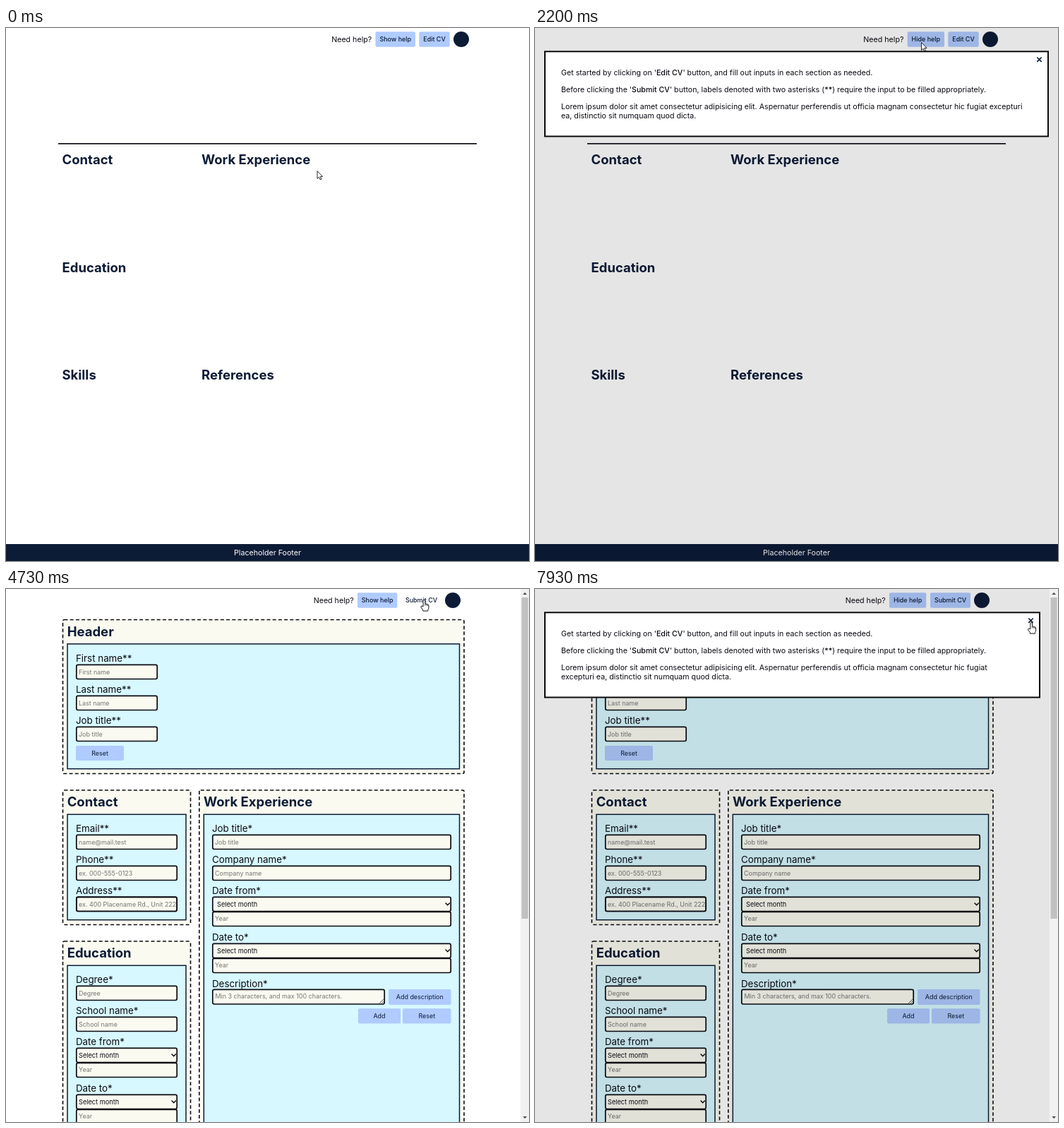
Animation of 741x755 px, one loop 8000 ms. Source, as an HTML page:

```html
<!DOCTYPE html>
<html lang="en">
<head>
<meta charset="utf-8">
<title>CV builder</title>
<style>
  html, body { margin: 0; width: 100%; height: 100%; overflow: hidden; background: #fff; }
  svg { display: block; width: 741px; height: 755px; }
  text { font: 10.667px Inter, Roboto, sans-serif; fill: #0a0a12; white-space: pre; }
  .title { font-size: 18.5px; font-weight: 700; fill: #0c1b36; }
  .label { font-size: 13.333px; }
  .hint, .btn { font-size: 8.95px; }
  .hint { fill: #757575; }
  .pick { font-size: 9.2px; }
  .btn { fill: #0c1b36; text-anchor: middle; }
  .strong { font-weight: 500; }
  .end { text-anchor: end; }
  .foot { fill: #fff; text-anchor: middle; }
  .raised { filter: drop-shadow(0 .7px 1.1px rgba(0, 0, 0, .75)); }
  .panel { fill: #fafaf0; stroke: #0a0a12; stroke-width: 1.6; stroke-dasharray: 5 3.2; }
  .inner { fill: #d7f8ff; stroke: #0c1b36; stroke-width: 1.5; }
  .field { fill: #fafaf0; stroke: #0a0a12; stroke-width: 1.7; }
  .line { fill: none; stroke: #0a0a12; stroke-linecap: round; }
</style>
</head>
<body>
<svg viewBox="0 0 741 755">
  <g id="page"></g>
  <g id="cursor" fill="#fff" stroke="#111" stroke-width="1" stroke-linejoin="round">
    <path id="arrow" d="M.5.5V11.4L3 9.1 4.7 12.9 6.5 12.1 4.8 8.4H8Z" stroke-width=".9"/>
    <g id="hand">
      <path d="M-1.4 9.3V1.4Q-1.4 0 0 0T1.4 1.4V5.4Q2.8 4.8 3.4 6 4.7 5.4 5.2 6.6 6.4 6.3 6.4 8V11Q6.4 13 5.3 14V15.6H-1.7V14.4L-4.5 10.4Q-5 8.6-3.6 8.5Z"/>
      <path d="M1.4 5.4V8M3.4 6V8.2M5.2 6.6V8.4" fill="none" stroke-width=".8"/>
    </g>
  </g>
</svg>
<script>
const LOOP = 8000;
const NAVY = '#0c1b36';
const BLUE = '#afcbff';
const $ = id => document.getElementById(id);

// Cursor moves: start, end, target x, target y
const START = [440.5, 202];
const MOVES = [
  [570, 600, 439.5, 201.5], [840, 930, 438.5, 200.5], [1150, 1800, 548.5, 21],
  [2140, 2200, 547, 20], [3080, 3330, 439.5, 13], [3760, 3800, 438.8, 12.8],
  [4000, 4470, 592.5, 15.5], [4820, 5130, 646.5, 55.5], [6220, 6680, 543.5, 22],
  [7150, 7900, 703.2, 47.5]
];

const text = (x, y, s, cls = '') => `<text x="${x}" y="${y}" class="${cls}">${s}</text>`;

const box = (x, y, x2, y2, attrs) =>
  `<rect x="${x}" y="${y}" width="${x2 - x}" height="${y2 - y}" ${attrs}/>`;

const button = (x, y, x2, y2, s, cls = '', attrs = '') =>
  box(x, y, x2, y2, attrs || `rx="2" fill="${BLUE}"`) +
  text((x + x2) / 2, (y + y2) / 2 + 3.3, s, 'btn ' + cls);

const field = (x, x2, y, y2 = y + 20.5) => box(x + .8, y + .4, x2 - .8, y2, 'rx="2.2" class="field"');

const input = (x, x2, y, label, hint) =>
  text(x, y - 4.3, label, 'label') + field(x, x2, y) + text(x + 4, y + 13.8, hint, 'hint');

const date = (x, x2, y, label, pad) =>
  text(x, y - 4.3, label, 'label') + field(x, x2, y) +
  text(x + pad, y + 13.6, 'Select month', 'pick') +
  `<path class="line" stroke-width="1.5" d="M${x2 - 8} ${y + 9}l2.7 2.7 2.7-2.7"/>` +
  field(x, x2, y + 21) + text(x + 4, y + 34.4, 'Year', 'hint');

const section = (x, y, x2, y2, title) =>
  box(x + .5, y + .5, x2 - .5, y2 - .5, 'rx="2" class="panel"') +
  text(x + 6.7, y + 23.6, title, 'title') +
  box(x + 7, y + 34.8, x2 - 7, y2 - 7.3, 'class="inner"');

function viewPage() {
  const titles = [[79.5, 193, 'Contact'], [277, 193, 'Work Experience'], [79.5, 345.5, 'Education'],
    [79.5, 498, 'Skills'], [277, 498, 'References']];
  return box(74, 163, 667, 164.7, 'fill="#0f0f18"') +
    titles.map(a => text(...a, 'title')).join('') +
    box(0, 731, 741, 755, `fill="${NAVY}"`) + text(370.5, 747, 'Placeholder Footer', 'foot');
}

function editPage() {
  return section(80, 43, 649.5, 262, 'Header') +
    input(99, 215, 107, 'First name**', 'First name') +
    input(99, 215, 151, 'Last name**', 'Last name') +
    input(99, 215, 195, 'Job title**', 'Job title') +
    button(99, 222, 167, 243, 'Reset') +

    section(80, 284.5, 262, 476, 'Contact') +
    input(99, 243, 348, 'Email**', 'name@mail.test') +
    input(99, 243, 392, 'Phone**', 'ex. 000-555-0123') +
    '<clipPath id="clip"><rect x="99" y="410" width="143" height="50"/></clipPath><g clip-path="url(#clip)">' +
    input(99, 243, 436, 'Address**', 'ex. 400 Placename Rd., Unit 222, N') + '</g>' +
    box(99.8, 436.4, 242.2, 456.5, 'rx="2.2" class="field" style="fill:none"') +

    section(80, 498.5, 262, 900, 'Education') +
    input(99, 243, 562, 'Degree*', 'Degree') +
    input(99, 243, 606, 'School name*', 'School name') +
    date(99, 243, 650, 'Date from*', 4) +
    date(99, 243, 716, 'Date to*', 4) +

    section(273.3, 284.5, 649.5, 900, 'Work Experience') +
    input(292, 631, 348, 'Job title*', 'Job title') +
    input(292, 631, 392, 'Company name*', 'Company name') +
    date(292, 631, 436, 'Date from*', 7) +
    date(292, 631, 502, 'Date to*', 7) +
    text(292, 563.5, 'Description*', 'label') + field(292, 537, 567, 588) +
    text(296.5, 579.5, 'Min 3 characters, and max 100 characters.', 'hint') +
    '<path class="line" stroke-width=".7" d="M529.5 586.5l5-5M532.5 586.5l2-2"/>' +
    button(542, 567, 630.5, 589, 'Add description') +
    button(499, 594.3, 559, 615.5, 'Add') +
    button(562, 594.3, 630.5, 615.5, 'Reset');
}

function scrollbar() {
  return box(729, 0, 741, 755, 'fill="#f1f1f1"') + box(730.5, 12, 739.7, 467, 'fill="#c1c1c1"') +
    '<path fill="#505050" d="M732.3 8l2.9-3.2 2.9 3.2zM732.3 747l2.9 3.2 2.9-3.2z"/>';
}

// Left and right edges of the two buttons in the top bar
const edges = (edit, open) => edit
  ? { help: [open ? 502 : 498, 554.3], mode: [560, 617] }
  : { help: [open ? 527.7 : 523.5, 580], mode: [585.3, 628.7] };

function topBar(edit, open, hover) {
  const e = edges(edit, open);
  const skin = (name, flat) => hover === name ? `rx="2" fill="#fff" ${flat ? '' : 'class="raised"'}` : '';
  return text(e.help[0] - 5.3, 20, 'Need help?', 'end') +
    button(e.help[0], 5.3, e.help[1], 26.7, open ? 'Hide help' : 'Show help', 'strong', skin('help')) +
    button(e.mode[0], 5.3, e.mode[1], 26.7, edit ? 'Submit CV' : 'Edit CV', 'strong', skin('mode', edit)) +
    `<circle cx="${edit ? 633 : 645}" cy="16" r="11" fill="${NAVY}"/>`;
}

function dialog(edit) {
  const right = edit ? 716 : 728;
  const strong = s => `<tspan class="strong">${s}</tspan>`;
  const lorem = 'Lorem ipsum dolor sit amet consectetur adipisicing elit. Aspernatur perferendis ut officia ' +
    'magnam consectetur hic fugiat';
  const tail = 'ea, distinctio sit numquam quod dicta.';
  return box(0, 0, edit ? 729 : 741, 755, 'fill="#000" opacity=".1"') +
    box(14, 33.3, right - 1, 153.5, 'fill="#fff" stroke="#0a0a0a" stroke-width="2"') +
    `<path class="line" stroke-width="1.7" style="stroke:${NAVY}" d="M${right - 16.2} 42l5.4 5.4m0-5.4l-5.4 5.4"/>` +
    text(37, 66.6, `Get started by clicking on '${strong('Edit CV')}' button, and fill out inputs in each section as needed.`) +
    text(37, 90.6, `Before clicking the '${strong('Submit CV')}' button, labels denoted with two asterisks (${strong('**')}) require the input to be filled appropriately.`) +
    text(37, 114.8, edit ? lorem : lorem + ' excepturi') +
    text(37, 127.8, edit ? 'excepturi ' + tail : tail);
}

function cursorAt(t) {
  let [x, y] = START;
  for (const [a, b, tx, ty] of MOVES) {
    const p = Math.min(1, Math.max(0, (t - a) / (b - a)));
    const k = p * p * (3 - 2 * p);
    x += (tx - x) * k;
    y += (ty - y) * k;
  }
  return [x, y];
}

function hoverAt(x, y, edit, open) {
  if (open) return edit && x > 697 && y > 38 && y < 52 ? 'close' : '';
  if (y < 5 || y > 27) return '';
  const e = edges(edit, open);
  return Object.keys(e).find(name => x >= e[name][0] && x <= e[name][1]) || '';
}

let shown = '';

function draw(t) {
  const edit = t >= 4670;
  const open = t >= 2200 && t < 4000 || t >= 6800;
  const [x, y] = cursorAt(t);
  const hover = hoverAt(x, y, edit, open);
  const state = [edit, open, hover].join();
  if (state !== shown) {
    shown = state;
    $('page').innerHTML = (edit ? editPage() : viewPage()) + topBar(edit, open, hover) +
      (open ? dialog(edit) : '') + (edit ? scrollbar() : '');
  }
  const hand = hover && !(t >= 6700 && t < 6800);
  $('cursor').setAttribute('transform', `translate(${x.toFixed(2)} ${y.toFixed(2)})`);
  $('hand').style.display = hand ? '' : 'none';
  $('arrow').style.display = hand ? 'none' : '';
}

function tick(now) {
  draw(now % LOOP);
  requestAnimationFrame(tick);
}
draw(0);
requestAnimationFrame(tick);
</script>
</body>
</html>
```
